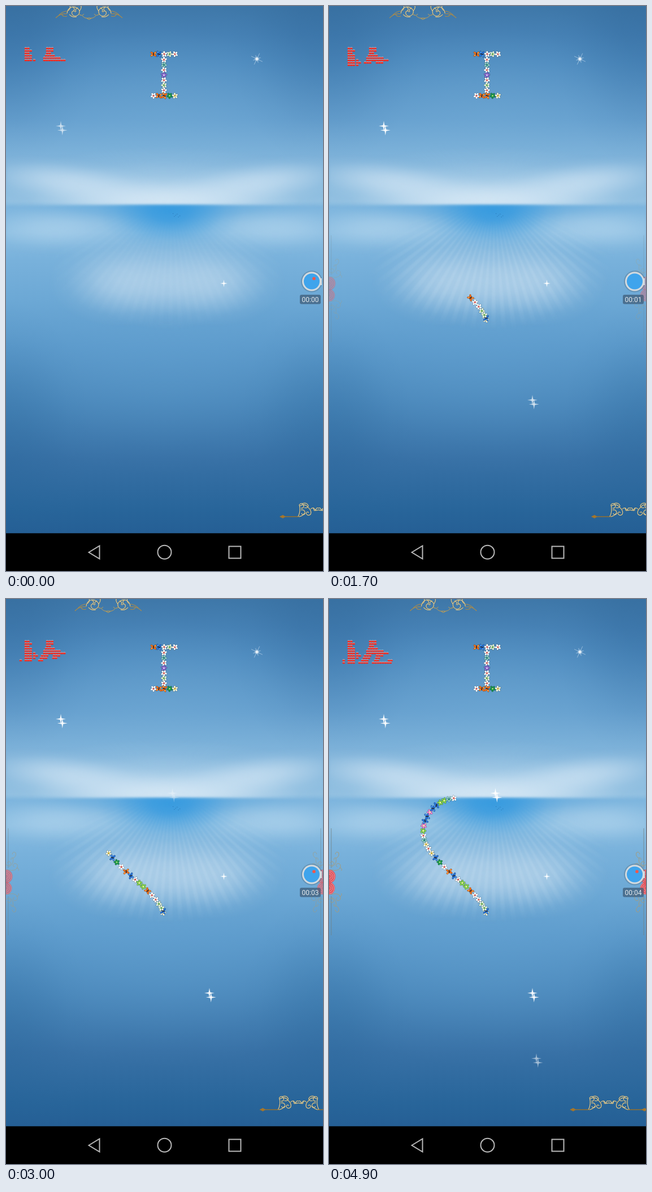
An HTML page with a canvas for the animation above (5 s loop, 561x998 px).

```html
<!DOCTYPE html>
<html lang="en">
<head>
<meta charset="utf-8">
<title>Flower writing</title>
<style>
html, body { margin: 0; width: 100%; height: 100%; overflow: hidden; background: #000; }
canvas { display: block; width: 561px; height: 998px; }
</style>
</head>
<body>
<canvas id="stage" width="561" height="998"></canvas>
<script>
const W = 561, H = 998, FLOOR = 931.5, LOOP = 5000, TAU = Math.PI * 2;
const stage = document.getElementById('stage').getContext('2d');
const clamp = v => Math.max(0, Math.min(1, v));

function keyed(keys, t) {
  for (let i = 1; i < keys.length; i++) {
    const [t0, a] = keys[i - 1], [t1, b] = keys[i];
    if (t <= t1) return a + (b - a) * (t - t0) / (t1 - t0);
  }
  return keys[keys.length - 1][1];
}

function disc(c, x, y, rx, ry = rx, turn = 0) {
  c.beginPath();
  c.ellipse(x, y, rx, ry, turn, 0, TAU);
  c.fill();
}

function glow(c, x, y, rx, ry, rgb, alpha, turn = 0) {
  c.save();
  c.translate(x, y);
  c.rotate(turn);
  c.scale(rx, ry);
  const g = c.createRadialGradient(0, 0, 0, 0, 0, 1);
  for (const s of [0, .25, .5, .75, 1]) {
    g.addColorStop(s, `rgba(${rgb},${alpha * (1 + Math.cos(Math.PI * s)) / 2})`);
  }
  c.fillStyle = g;
  disc(c, 0, 0, 1);
  c.restore();
}

function layer(paint) {
  const el = document.createElement('canvas');
  el.width = W;
  el.height = H;
  paint(el.getContext('2d'));
  return el;
}

const upperLight = layer(c => {
  c.rect(0, 0, W, 351.5);
  c.clip();
  glow(c, 280, 352, 330, 105, '205,227,243', .66);
  glow(c, 280, 346, 240, 46, '220,235,246', .7);
  for (const s of [-1, 1]) {
    glow(c, 280 + s * 165, 312, 185, 43, '213,231,245', .62, -s * .13);
  }
});

const lowerLight = layer(c => {
  c.rect(0, 351.5, W, 240);
  c.clip();
  for (const s of [-1, 1]) glow(c, 282 + s * 195, 393, 165, 46, '178,213,237', .62);
  glow(c, 282, 353, 270, 34, '84,165,222', .6);
  glow(c, 290, 362, 130, 72, '48,152,223', .85);
  for (const s of [-1, 1]) glow(c, 285 + s * 85, 486, 125, 80, '190,216,236', .62);
  glow(c, 285, 488, 140, 84, '190,216,236', .62);
});

const sky = layer(c => {
  const g = c.createLinearGradient(0, 0, 0, FLOOR);
  const stops = [[0, '#3e77a8'], [50, '#447fb3'], [100, '#4d8abe'], [200, '#659fce'], [260, '#7cb1d9'],
    [345, '#8ebee0'], [356, '#7db5de'], [400, '#88bce1'], [450, '#78b1db'], [520, '#6ca8d5'],
    [600, '#5c9acb'], [700, '#4a87ba'], [800, '#3871a6'], [890, '#28659a'], [931, '#255f95']];
  stops.forEach(([y, color]) => g.addColorStop(y / FLOOR, color));
  c.fillStyle = g;
  c.fillRect(0, 0, W, FLOOR);
  glow(c, 280, 180, 330, 190, '125,182,221', .25);
  glow(c, 280, 630, 330, 200, '105,168,215', .24);
  for (const x of [0, W]) {
    glow(c, x, 30, 170, 260, '38,92,142', .26);
    glow(c, x, 750, 150, 230, '32,94,146', .22);
  }
  c.filter = 'blur(2px)';
  c.drawImage(upperLight, 0, 0);
  c.drawImage(lowerLight, 0, 0);
  c.filter = 'none';
  c.fillStyle = 'rgba(35,105,165,.6)';
  for (let i = 0; i < 6; i++) c.fillRect(295 + i * 2.4, 366 + (i * 5 % 7), 1.2, 1.2);
});

const rays = layer(c => {
  c.filter = 'blur(0.8px)';
  c.translate(285, 460);
  c.scale(220, 115);
  const g = c.createRadialGradient(0, 0, 0, 0, 0, 1);
  g.addColorStop(0, 'rgba(225,240,250,.14)');
  g.addColorStop(.6, 'rgba(215,234,248,.12)');
  g.addColorStop(1, 'rgba(205,230,248,0)');
  c.fillStyle = g;
  const point = (r, a) => c.lineTo((7 + r * Math.sin(a)) / 220, (r * Math.cos(a) - 130) / 115);
  for (let a = -1.22; a < 1.23; a += .076) {
    c.beginPath();
    point(40, a);
    point(330, a - .019);
    point(330, a + .019);
    c.fill();
  }
});

const BLOOMS = {
  w: ['#fff', '#d84a42'], y: ['#f7f7dc', '#c9a51c'], n: ['#e4f5dc', '#58a53c'],
  g: ['#83d446', '#f3f5a0'], G: ['#159347', '#9be06e'], t: ['#8cccc4', '#18796e'],
  p: ['#ef83cf', '#fff0a0'], v: ['#8c67d2', '#e3d6ff'], b: ['#246fd5', '#73baff'], o: ['#ef6d18', '#ffc265']
};

function bloom(c, x, y, kind, seed) {
  const [main, accent] = BLOOMS[kind];
  c.save();
  c.translate(x, y);
  c.rotate(seed * 1.7);
  c.lineWidth = .9;
  c.strokeStyle = 'rgba(20,35,40,.5)';
  c.fillStyle = main;
  const wings = 'bo'.includes(kind);
  const petals = wings ? 4 : 5;
  for (let i = 0; i < petals; i++) {
    const a = wings ? [-.65, .65, 2.5, 3.8][i] : i * TAU / petals;
    c.beginPath();
    c.ellipse(Math.cos(a) * 3, Math.sin(a) * 3, wings ? 3.2 : 2.4, 1.6, a, 0, TAU);
    c.stroke();
    c.fill();
  }
  c.fillStyle = accent;
  if (wings) {
    disc(c, 3, -2, .9);
    disc(c, -3, 2, .9);
    c.fillStyle = '#27272b';
    disc(c, 0, 0, .8, 3.2);
  } else disc(c, 0, 0, 1.5);
  c.restore();
}

const letter = layer(c => {
  [...'obwnw'].forEach((k, i) => bloom(c, 261 + i * 9.5, 85, k, i));
  [...'wtwvwnw'].forEach((k, i) => bloom(c, 279.5, 95 + i * 9, k, i + 5));
  [...'wooGy'].forEach((k, i) => bloom(c, 261 + i * 9.5, 158.5, k, i + 12));
});

// Each knot is three blooms further along the stroke.
const KNOTS = [[278, 551], [265, 531], [243, 508], [221, 489], [196, 465], [176, 441],
  [167, 418], [170, 392], [184, 370], [204, 356], [227, 351]];
const GARLAND = 'ybnnwwoggwbowGbywytwgpbbpbbggtw';
const GROWTH = [[0, -8], [700, .2], [1300, 4.3], [2100, 9.3], [3000, 15.3], [4200, 24.3], [4900, 30.3]];

function garlandPoint(i) {
  if (i < 1) return [278, 554];
  const k = Math.floor((i - 1) / 3), u = (i - 1) / 3 - k;
  const at = n => KNOTS[Math.max(0, Math.min(KNOTS.length - 1, n))];
  const [a, b, d, e] = [at(k - 1), at(k), at(k + 1), at(k + 2)];
  return [0, 1].map(j => b[j] + .5 * u * (d[j] - a[j] + u * (2 * a[j] - 5 * b[j] + 4 * d[j] - e[j]
    + u * (3 * (b[j] - d[j]) + e[j] - a[j]))));
}

function garland(c, t) {
  const last = keyed(GROWTH, t);
  for (let i = 0; i <= last && i < GARLAND.length; i++) bloom(c, ...garlandPoint(i), GARLAND[i], i);
}

// Red writing: spans of hearts per row, uncovered from left to right.
const SPANS = [
  [33, 41, 71, 83], [33, 47, 71, 85], [33, 42, 71, 80], [33, 46, 69, 88], [33, 46, 66, 97],
  [33, 46, 48, 52, 66, 104], [33, 46, 48, 57, 62, 76, 83, 96], [33, 47, 48, 53, 60, 73, 82, 91],
  [24, 29, 33, 46, 57, 71, 80, 89, 104, 113], [24, 29, 33, 46, 52, 71, 76, 113]
];

function writing(c, t) {
  const progress = 6 + t * .00082;
  SPANS.forEach((spans, row) => {
    const limit = 22 + clamp(progress - row) * 92, y = 75 + row * 4.2;
    for (let i = 0; i < spans.length; i += 2) {
      for (let x = spans[i] + 2; x < spans[i + 1] && x < limit; x += 4.4) {
        c.fillStyle = 'rgba(245,190,185,.6)';
        disc(c, x, y - 1, 2.3, 1.4);
        c.fillStyle = '#ee2e24';
        disc(c, x, y + .3, 2.6, 1.45);
      }
    }
  });
}

function gold(c, d) {
  const path = new Path2D(d);
  for (const [color, width] of [['rgba(85,90,75,.4)', 1.7], ['#c3a45c', 1.1], ['#f3ebc8', .6]]) {
    c.strokeStyle = color;
    c.lineWidth = width;
    c.stroke(path);
  }
}

function mirrored(c, x, y, paint) {
  for (const s of [-1, 1]) {
    c.save();
    c.translate(x, y);
    c.scale(s, 1);
    paint();
    c.restore();
  }
}

function crest(c, x) {
  mirrored(c, x, 0, () => {
    c.strokeStyle = '#a88a4c';
    c.lineWidth = 1.2;
    c.stroke(new Path2D('M59 21Q50 12 39 14M55 18Q48 9 38 9M49 14Q46 20 39 18'));
    gold(c, 'M39 13Q38 4 31 2Q22 0 17 8Q16 17 25 18Q32 16 30 10Q27 7 24 11'
      + 'M37 8Q32 5 34 -1M17 9Q12 2 15 -1M35 15Q29 21 22 19M28 2Q24 6 28 9M20 3Q26 6 23 10');
    c.strokeStyle = '#b39a5c';
    c.lineWidth = 1.1;
    c.stroke(new Path2D('M18 14Q13 19 9 14M12 17Q7 23 0 21M5 21L0 24'));
  });
}

function baseboard(c, x) {
  mirrored(c, x, 0, () => {
    c.strokeStyle = '#94712f';
    c.lineWidth = 1.3;
    c.stroke(new Path2D('M33 902H68'));
    c.fillStyle = '#a5762b';
    c.fill(new Path2D('M69 902L63 899L58 902L63 905Z'));
    gold(c, 'M36 902Q31 892 34 881Q30 876 26 882Q26 888 31 887'
      + 'M33 883Q24 878 19 885Q11 892 14 898Q19 902 22 896Q20 892 17 895'
      + 'M31 890Q23 889 24 897Q28 901 30 896M29 879Q20 876 18 883Q20 888 25 886M34 902Q28 901 25 896');
    gold(c, 'M14 889Q11 885 8 888Q9 892 5 891Q4 885 0 887M9 886Q6 891 3 891Q0 889 0 891');
  });
}

function sideFrame(c) {
  c.strokeStyle = 'rgba(115,130,130,.75)';
  c.lineWidth = 1;
  c.stroke(new Path2D('M4 405V475M4 525V594'));
  c.strokeStyle = '#a39c80';
  c.lineWidth = 1;
  for (const s of [-1, 1]) {
    c.save();
    c.translate(0, 500);
    c.scale(1, s);
    c.stroke(new Path2D('M3 22Q15 18 20 25Q22 33 15 33Q10 29 15 27M5 27Q15 32 12 43Q8 43 9 39'
      + 'M12 42Q19 45 17 52Q12 55 11 49M0 31Q5 26 9 33Q6 39 2 34M18 25Q24 25 22 20'));
    c.restore();
  }
  c.fillStyle = '#df535c';
  disc(c, 0, 490, 11.5, 12);
  disc(c, 0, 511, 10.5, 11);
  c.strokeStyle = '#f09aa0';
  c.lineWidth = 1;
  for (const r of [4, 7, 10]) {
    c.beginPath();
    c.ellipse(0, 490, r, r, 0, -1.5, 1.3);
    c.stroke();
    c.beginPath();
    c.ellipse(0, 511, r - .7, r - .3, 0, -1.2, 1.5);
    c.stroke();
  }
}

function sides(c, t) {
  c.save();
  c.globalAlpha = clamp(t / 4900);
  sideFrame(c);
  c.translate(W, 0);
  c.scale(-1, 1);
  sideFrame(c);
  c.restore();
}

function star(c, x, y, r) {
  c.fillStyle = '#fff';
  c.beginPath();
  for (let i = 0; i < 8; i++) {
    const a = i * TAU / 8, d = i % 2 ? r * .2 : r;
    c.lineTo(x + d * Math.cos(a), y + d * Math.sin(a));
  }
  c.fill();
  glow(c, x, y, r * .5, r * .5, '255,255,255', .4);
}

function sparkles(c, t) {
  for (const [x, y, start, span] of [[97, 212, -1100, 1800], [360, 696, 700, 1400],
    [294.5, 343, 2550, 1500], [367, 811.5, 4050, 1700]]) {
    c.globalAlpha = .95 * clamp((t - start) / span);
    star(c, x, y, 9);
    star(c, x + 2.8, y + 7.5, 9);
  }
  c.globalAlpha = .95;
  star(c, 385.5, 490, 6.5);
  c.globalAlpha = 1;
  c.strokeStyle = 'rgba(230,243,252,.6)';
  c.lineWidth = .8;
  for (let i = 0; i < 8; i++) {
    const a = .45 + i * TAU / 8, r = i % 2 ? 7 : 11;
    c.beginPath();
    c.moveTo(444, 93.5);
    c.lineTo(444 + r * Math.cos(a), 93.5 + r * Math.sin(a));
    c.stroke();
  }
  glow(c, 444, 93.5, 5, 5, '255,255,255', 1);
}

function recorder(c, t) {
  c.fillStyle = 'rgba(85,115,140,.45)';
  disc(c, 541, 486.5, 19);
  c.fillStyle = '#d3dadf';
  c.fillRect(554, 481, 5, 12);
  disc(c, 541, 486.5, 17);
  c.fillStyle = '#3fa4ec';
  disc(c, 541, 486.5, 14);
  if ((t + 200) % 1000 < 400) {
    c.fillStyle = '#f2574b';
    disc(c, 545, 481.5, 2.8);
  }
  c.fillStyle = 'rgba(62,91,118,.72)';
  c.beginPath();
  c.roundRect(520, 510, 37, 16.5, 3);
  c.fill();
  c.fillStyle = '#e3e9ee';
  c.font = '12px Roboto, sans-serif';
  c.textAlign = 'center';
  c.fillText('00:0' + Math.floor(t / 1000), 538.5, 523);
}

function navBar(c) {
  c.fillStyle = '#000';
  c.fillRect(0, FLOOR, W, H - FLOOR);
  c.strokeStyle = '#b9b9b9';
  c.lineWidth = 2;
  c.lineJoin = 'miter';
  c.stroke(new Path2D('M146.5 965L165.5 953.5V976.5Z'));
  c.beginPath();
  c.arc(280.5, 964.8, 12, 0, TAU);
  c.stroke();
  c.strokeRect(394.5, 954.5, 21, 21);
}

function draw(t) {
  const c = stage;
  c.drawImage(sky, 0, 0);
  c.globalAlpha = .35 + .65 * clamp(t / 600);
  c.drawImage(rays, 0, 0);
  c.globalAlpha = 1;
  crest(c, 147 + t * .0113);
  baseboard(c, 553 - t * .0118);
  sides(c, t);
  sparkles(c, t);
  writing(c, t);
  c.drawImage(letter, 0, 0);
  garland(c, t);
  recorder(c, t);
  navBar(c);
}

const began = performance.now();
function tick() {
  const t = (performance.now() - began) % LOOP;
  draw(Math.floor(t / 100) * 100);
  requestAnimationFrame(tick);
}
tick();
</script>
</body>
</html>
```
